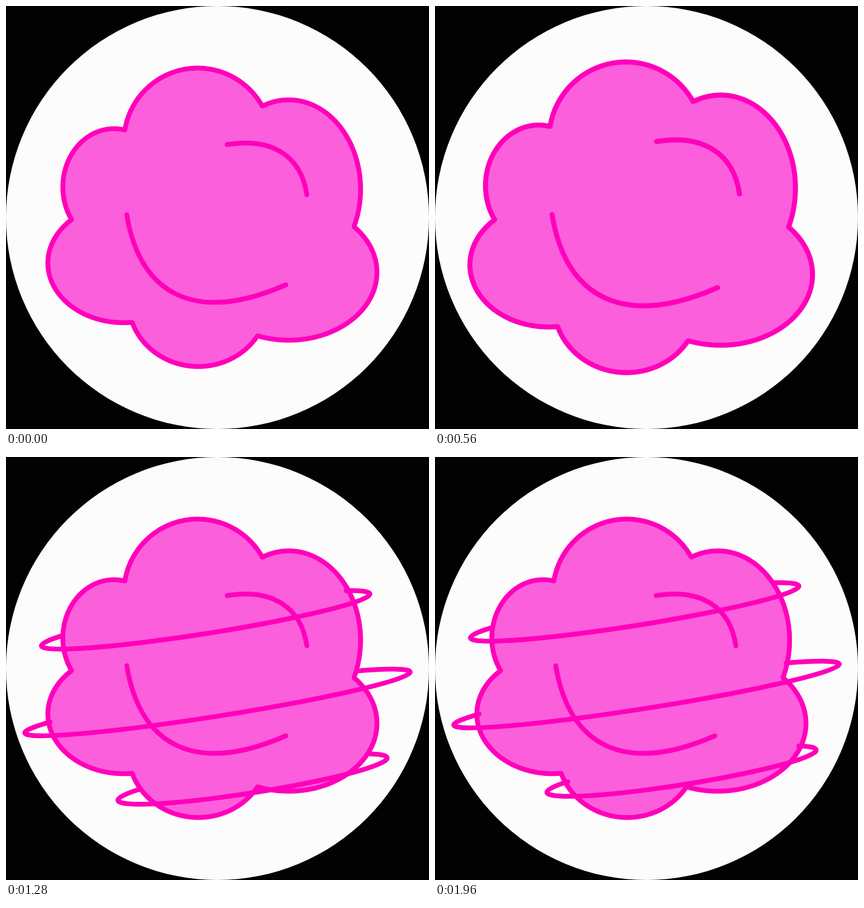
An HTML page with a canvas that plays this animation: 748 px wide and 748 px high, repeating every 2000 ms.

```html
<!DOCTYPE html>
<html lang="en">
<head>
<meta charset="utf-8">
<title>Cloud with rings</title>
<style>
html, body { margin: 0; width: 100%; height: 100%; overflow: hidden; background: #020202; }
canvas { display: block; }
</style>
</head>
<body>
<canvas id="stage" width="748" height="748"></canvas>
<script>
const ctx = document.getElementById('stage').getContext('2d');
const SIZE = 748, MID = SIZE / 2, LOOP = 2000, STEP = 40;
const BACK = '#020202', PAPER = '#fcfcfc', FILL = '#fb5fdb', LINE = '#ff00bb';

// Distance from the middle, in direction a, to the far side of an ellipse
function reach(a, { x, y, rx, ry }) {
  const ux = Math.cos(a) / rx, uy = Math.sin(a) / ry;
  const px = (MID - x) / rx, py = (MID - y) / ry;
  const uu = ux * ux + uy * uy, up = ux * px + uy * py;
  const root = up * up - uu * (px * px + py * py - 1);
  return root < 0 ? 0 : (Math.sqrt(root) - up) / uu;
}

// Outline of overlapping ellipses: the farthest lobe in each direction
function outline(lobes, steps = 1800) {
  const path = new Path2D();
  for (let i = 0; i < steps; i++) {
    const a = 2 * Math.PI * i / steps;
    const r = Math.max(...lobes.map(lobe => reach(a, lobe)));
    path.lineTo(MID + r * Math.cos(a), MID + r * Math.sin(a));
  }
  path.closePath();
  return path;
}

const cloud = outline([
  { x: 339, y: 240.3, rx: 130.5, ry: 130.5 },
  { x: 500, y: 324, rx: 127, ry: 158 },
  { x: 500, y: 471, rx: 156, ry: 120 },
  { x: 340, y: 522, rx: 123.5, ry: 115.5 },
  { x: 208, y: 454.5, rx: 134, ry: 105.5 },
  { x: 191, y: 320, rx: 90.5, ry: 103 }
]);
const folds = new Path2D(`M391 245 C470 232 522 265 532 334
  M213.5 369 C237 511 335 563 495 493`);

// The back of a ring is hidden between the angles right and left
const rings = new Path2D();
function addRing(x, y, rx, right = 0.53, left = 0.53) {
  const ring = new Path2D();
  ring.ellipse(x, y, rx, 24, -0.157, -right, Math.PI + left);
  rings.addPath(ring);
}
addRing(353, 274, 294);
addRing(374, 420, 345, 0.75);
addRing(436, 555.5, 241, 0.5, 0.58);

const clamp = v => Math.min(1, Math.max(0, v));
// Rises from 0 to 1 until peak, then falls back to 0 at end
const bump = (t, peak, end) => clamp(Math.min(t / peak, (end - t) / (end - peak)));

function draw(t) {
  const scale = 1 + 0.05 * bump(t, 480, 920);
  const fade = clamp((t - 1000) / 160);
  // Each bounce lasts 480 ms; the first begins during the fade, fully down
  const low = t < 1160 ? 1 : bump((t - 1000) % 480, 160, 480);

  ctx.fillStyle = BACK;
  ctx.fillRect(0, 0, SIZE, SIZE);
  ctx.fillStyle = PAPER;
  ctx.beginPath();
  ctx.arc(MID, MID, MID, 0, 2 * Math.PI);
  ctx.fill();

  ctx.lineWidth = 8.5;
  ctx.lineCap = ctx.lineJoin = 'round';
  ctx.strokeStyle = LINE;
  ctx.fillStyle = FILL;

  ctx.save();
  ctx.translate(MID, MID);
  ctx.scale(scale, scale);
  ctx.translate(-MID, -MID);
  ctx.fill(cloud);
  ctx.stroke(cloud);
  ctx.stroke(folds);
  ctx.restore();

  ctx.save();
  ctx.globalAlpha = fade;
  ctx.translate(0, 22.4 * low);
  ctx.stroke(rings);
  ctx.restore();
}

function tick() {
  const t = performance.now() % LOOP;
  draw(Math.floor(t / STEP) * STEP);
  requestAnimationFrame(tick);
}
tick();
</script>
</body>
</html>
```
